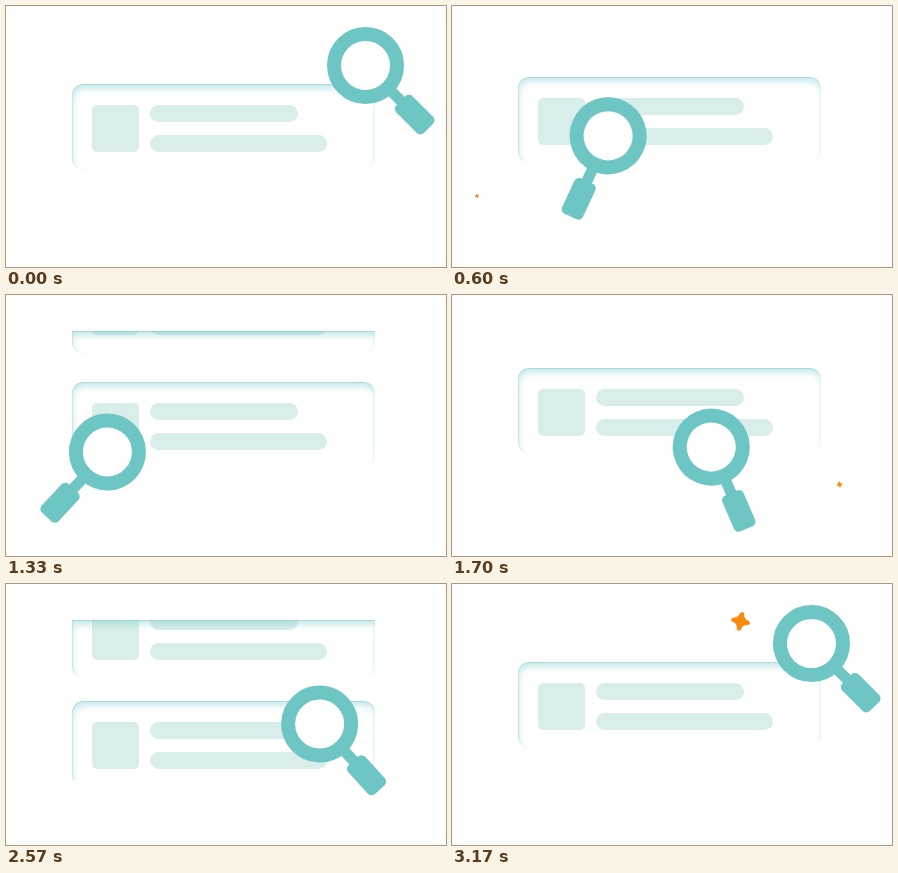
An HTML page that plays this animation: 440 by 261 pixels, repeating every 3.21 s.

```html
<!DOCTYPE html>
<html lang="en">
<head>
<meta charset="utf-8">
<title>Search loop</title>
<style>
  html, body { margin: 0; width: 100%; height: 100%; overflow: hidden; background: #fff; }
  #stage { position: relative; width: 440px; height: 261px; overflow: hidden; background: #fff; }
  #window { position: absolute; left: 66px; top: 36px; width: 303px; height: 160px; overflow: hidden; }
  .card { position: absolute; left: 0; width: 303px; overflow: hidden; background: #fff; }
  .card::after {
    content: ""; position: absolute; inset: 0; border-radius: inherit;
    box-shadow: inset 1px 5px 6px rgba(109, 198, 195, .36),
                inset 0 1px 1px rgba(109, 198, 195, .4),
                inset 1px 0 1px rgba(109, 198, 195, .22);
  }
  .rows { position: absolute; left: 0; width: 303px; height: 86px; }
  .rows i { position: absolute; background: #d9eeea; border-radius: 9px; height: 17px; left: 78px; }
  .rows i:nth-child(1) { left: 20px; top: 21px; width: 47px; height: 47px; border-radius: 5px; }
  .rows i:nth-child(2) { top: 21px; width: 148px; }
  .rows i:nth-child(3) { top: 51px; width: 177px; }
  svg { position: absolute; left: 0; top: 0; }
</style>
</head>
<body>
<div id="stage">
  <div id="window">
    <div class="card"><div class="rows"><i></i><i></i><i></i></div></div>
    <div class="card"><div class="rows"><i></i><i></i><i></i></div></div>
  </div>
  <svg width="440" height="261" viewBox="0 0 440 261">
    <path id="spark" fill="#f78b0e"
      d="M-2 -8.2Q0 -11 2 -8.2Q2.6 -2.6 8.2 -2Q11 0 8.2 2Q2.6 2.6 2 8.2Q0 11 -2 8.2Q-2.6 2.6 -8.2 2Q-11 0 -8.2 -2Q-2.6 -2.6 -2 -8.2Z"/>
    <!-- Pivot sits 24px from the lens centre, towards the grip -->
    <g id="glass">
      <g transform="translate(-24 0)" fill="#6dc6c3">
        <rect x="36" y="-5.5" width="18" height="11"/>
        <rect x="50" y="-11.5" width="39" height="23" rx="5"/>
        <circle r="31.5" fill="#fff" stroke="#6dc6c3" stroke-width="14"/>
      </g>
    </g>
  </svg>
</div>
<script>
  const LOOP = 3210, BEAT = LOOP / 3;
  const REST = 78, CARD = 86, TRAVEL = 128, CLIP = 36, RADIUS = 11;

  // Glass pose, easing and sparkle position for each beat
  const beats = [
    { x: 376.5, y: 76.5, turn: 45, soft: .15, enter: .8, leave: .9, spark: [25, 190] },
    { x: 75.5, y: 174.5, turn: 136.4, soft: .19, enter: .63, leave: .85, spark: [387.5, 189.5] },
    { x: 320.5, y: 174, turn: 48, soft: .15, enter: .92, leave: .97, spark: [288.5, 37.3] }
  ];

  const [upper, lower] = document.querySelectorAll('.card');
  const glass = document.getElementById('glass');
  const spark = document.getElementById('spark');

  const mix = (a, b, p) => a + (b - a) * p;

  function bezier(t, x1, y1, x2, y2) {
    if (t <= 0) return 0;
    if (t >= 1) return 1;
    const at = (s, a, b) => 3 * (1 - s) * (1 - s) * s * a + 3 * (1 - s) * s * s * b + s * s * s;
    let lo = 0, hi = 1;
    for (let i = 0; i < 24; i++) {
      const mid = (lo + hi) / 2;
      if (at(mid, x1, x2) < t) lo = mid; else hi = mid;
    }
    return at(lo, y1, y2);
  }

  // The card is cut at the window top, so its inner shadow follows the cut
  function placeCard(card, top) {
    const cut = Math.max(0, CLIP - top);
    const height = CARD - cut;
    card.style.display = height > 0 ? 'block' : 'none';
    if (height <= 0) return;
    const corner = Math.max(0, RADIUS - cut);
    card.style.top = top + cut - CLIP + 'px';
    card.style.height = height + 'px';
    card.style.borderRadius = `${corner}px ${corner}px ${RADIUS}px ${RADIUS}px`;
    card.firstElementChild.style.top = -cut + 'px';
  }

  function placeSpark(time) {
    // A finished sparkle stays a moment into the next beat
    const index = Math.floor(Math.max(0, time - 26) / BEAT);
    const phase = time / BEAT - index;
    const grow = bezier((phase - .46) / .5, .33, .25, .5, 1);
    const [x, y] = beats[index].spark;
    spark.setAttribute('transform', `translate(${x} ${y}) rotate(${mix(-30, 12, grow)}) scale(${grow})`);
  }

  function draw(time) {
    const index = Math.floor(time / BEAT) % 3;
    const phase = time / BEAT - index;
    const from = beats[index], to = beats[(index + 1) % 3];

    const p = bezier(phase, .85, 0, from.soft, 1);
    glass.setAttribute('transform',
      `translate(${mix(from.x, to.x, p)} ${mix(from.y, to.y, p)}) rotate(${mix(from.turn, to.turn, p)})`);

    const slide = phase / .8;
    placeCard(upper, REST - TRAVEL * (1 - bezier(slide, from.enter, 0, .1, 1)));
    placeCard(lower, REST + TRAVEL * bezier(slide, from.leave, 0, .1, 1));
    placeSpark(time);
  }

  const start = performance.now();
  function tick() {
    draw((performance.now() - start) % LOOP);
    requestAnimationFrame(tick);
  }
  draw(0);
  requestAnimationFrame(tick);
</script>
</body>
</html>
```
